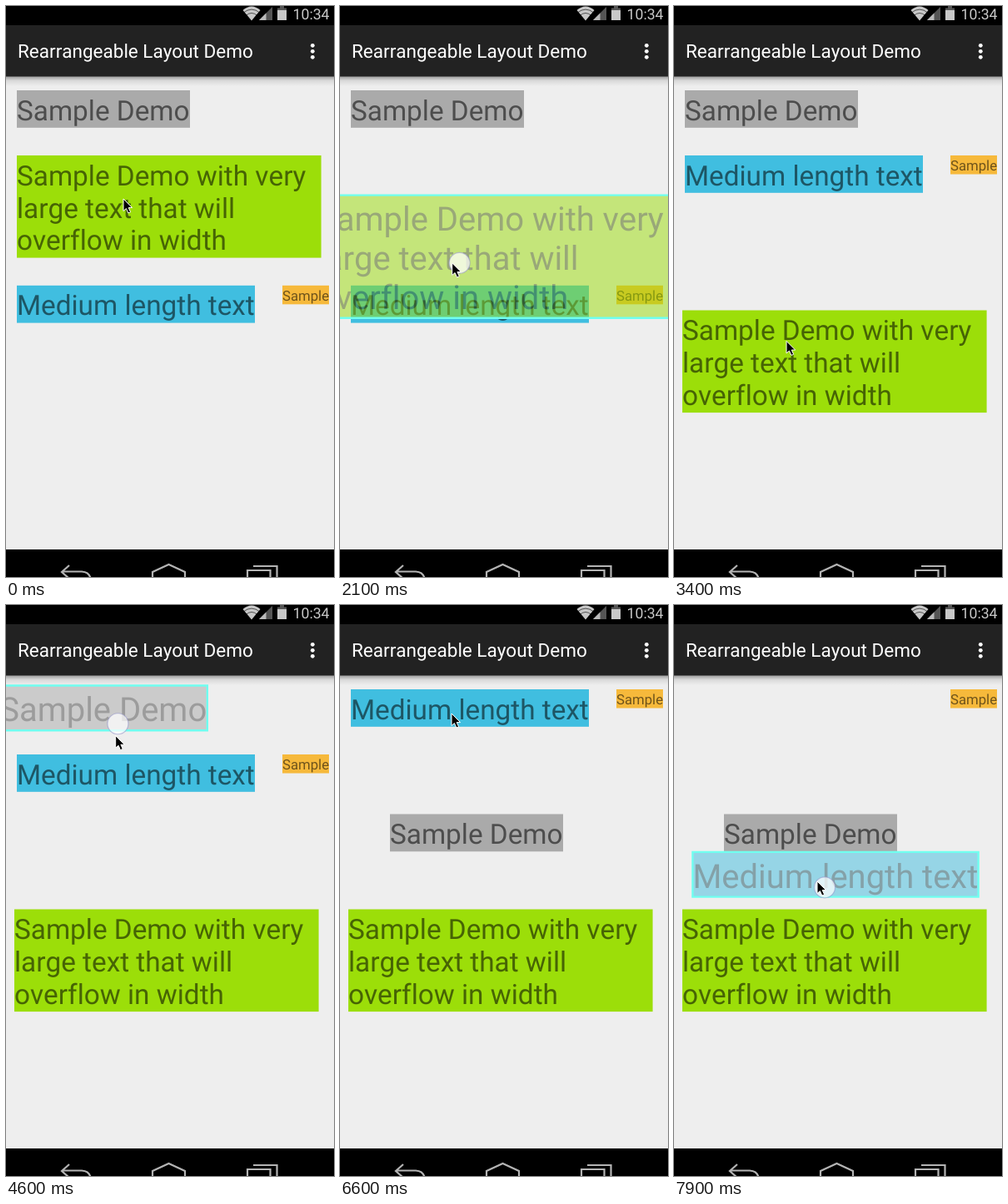
Write an HTML page that moves like this. It is 394 px wide and 684 px high and loops after 8 s.

```html
<!DOCTYPE html>
<html lang="en">
<head>
<meta charset="utf-8">
<title>Rearrangeable Layout Demo</title>
<style>
  html, body { margin: 0; width: 100%; height: 100%; overflow: hidden; background: #eee; }
  svg { display: block; width: 394px; height: 684px; font-family: Roboto, "Open Sans", sans-serif; }
  text { font-kerning: none; font-variant-ligatures: none; text-rendering: geometricPrecision; }
  .label { fill: #000; fill-opacity: .55; }
  .edge { fill: none; stroke: #70fff0; stroke-width: 2.4; vector-effect: non-scaling-stroke; }
</style>
</head>
<body>
<svg viewBox="0 0 394 684">
  <defs>
    <linearGradient id="shade" x2="0" y2="1">
      <stop offset="0" stop-color="#000" stop-opacity=".36"/>
      <stop offset=".45" stop-color="#000" stop-opacity=".09"/>
      <stop offset="1" stop-color="#000" stop-opacity="0"/>
    </linearGradient>
  </defs>
  <rect width="394" height="684" fill="#eee"/>
  <rect y="84" width="394" height="12" fill="url(#shade)"/>

  <g id="items"></g>

  <rect width="394" height="23" fill="#000"/>
  <rect y="23" width="394" height="61.5" fill="#222"/>
  <text x="14" y="62" font-size="22.5" fill="#fff">Rearrangeable Layout Demo</text>
  <g fill="#fff">
    <circle cx="368.3" cy="47.3" r="2.4"/>
    <circle cx="368.3" cy="54.3" r="2.4"/>
    <circle cx="368.3" cy="61.3" r="2.4"/>
  </g>

  <path d="M284.5 5Q295 -4 305.5 5L295 17.5z" fill="#c8c8c8"/>
  <path d="M285 8.2Q295 0 305 8.2M288 11.5Q295 5.5 302 11.5" fill="none" stroke="#000" stroke-opacity=".6"/>
  <path d="M320 1V17H304z" fill="#555"/>
  <path d="M312.5 8.5V17H304z" fill="#bbb"/>
  <path d="M326 2.5h3V0h5v2.5h3V17h-11z" fill="#555"/>
  <path d="M326 5h11v12h-11z" fill="#c8c8c8"/>
  <text x="344.5" y="16" font-size="17.7" fill="#c8c8c8">10:34</text>

  <rect y="651" width="394" height="33" fill="#000"/>
  <g fill="none" stroke="#b4b4b4" stroke-width="2.2">
    <path d="M76 670L67 678L76 686M67 677.5H91Q102 678 102 690"/>
    <path d="M176 690V678L195.5 669L215 678V690"/>
    <path d="M297 671H325.5V690M290 690V676H317.5V690"/>
  </g>

  <circle id="dot" r="12.5" fill="#fff" fill-opacity=".72" stroke="#8f90c8" stroke-opacity=".55" stroke-width="1.2"/>
  <path id="cursor" d="M0 0V14.5L3.4 11.6L5.8 17L8.6 15.8L6.2 10.6H10.6z" fill="#000" stroke="#fff"/>
</svg>
<script>
const LOOP = 8000, STEP = 100;
const DOT_LAG = 40, ITEM_LAG = 60;
const LEFT = 13, TOP = 101, GAP = 33.2, LINE = 38.9, PAD = 5.9;
const NS = "http://www.w3.org/2000/svg";
const byId = id => document.getElementById(id);

function add(parent, tag, attrs, text) {
  const el = document.createElementNS(NS, tag);
  for (const k in attrs) el.setAttribute(k, attrs[k]);
  if (text) el.textContent = text;
  return parent.appendChild(el);
}

function makeItem(w, fill, lines, scale = 1) {
  const h = (LINE * lines.length + PAD) * scale;
  const root = add(byId("items"), "g", {});
  const face = add(root, "g", {});
  add(face, "rect", { width: w, height: h, fill });
  lines.forEach((line, i) => add(face, "text", {
    class: "label", "font-size": 33.3 * scale, y: (35.6 + LINE * i) * scale
  }, line));
  const edge = add(root, "rect", { class: "edge", width: w, height: h });
  return { root, face, edge, w, h };
}

const yellow = makeItem(56, "#f6b93b", ["Sample"], .503);
const green = makeItem(365.6, "#9cde09",
  ["Sample Demo with very", "large text that will", "overflow in width"]);
const gray = makeItem(208, "#aaa", ["Sample Demo"]);
const blue = makeItem(286, "#40bee0", ["Medium length text"]);

// Lifted items grow around their centre and turn translucent.
function place(item, x, y, lifted = false) {
  const s = lifted ? 1.2 : 1;
  const left = x - item.w * (s - 1) / 2, top = y - item.h * (s - 1) / 2;
  item.root.setAttribute("transform", `translate(${left} ${top}) scale(${s})`);
  item.face.setAttribute("opacity", lifted ? .5 : 1);
  item.edge.setAttribute("visibility", lifted ? "visible" : "hidden");
  if (lifted) byId("items").appendChild(item.root);
}

const sine = u => (1 - Math.cos(Math.PI * u)) / 2;
const easeOut = u => 1 - (1 - u) ** 3;

// Pointer glides: start, end, destination, easing.
const home = [141, 231];
const glides = [
  [500, 600, 139, 236, sine],
  [1300, 1600, 134, 248, sine],
  [1600, 2850, 136, 421.5, sine],
  [3300, 3900, 122, 122, sine],
  [4540, 5240, 163, 269, easeOut],
  [5550, 5700, 169, 271.5, sine],
  [5900, 6500, 134, 130, sine],
  [7050, 7300, 172, 265, sine],
  [7300, 7900, 172, 331, sine]
];

function pointer(t) {
  let [x, y] = home;
  for (const [from, to, nx, ny, ease] of glides) {
    if (t <= from) break;
    const u = ease(Math.min(1, (t - from) / (to - from)));
    x += (nx - x) * u;
    y += (ny - y) * u;
  }
  return [x, y];
}

// Each drag frees one slot, and the items below move up.
const rows = [TOP, TOP + gray.h + GAP, TOP + gray.h + green.h + 2 * GAP];
const drags = [
  { item: green, row: 1, press: 600, lift: 1300, drop: 3100 },
  { item: gray, row: 0, press: 4000, lift: 4500, drop: 5800 },
  { item: blue, row: 0, press: 6700, lift: 7100, drop: LOOP }
];

function draw(t) {
  const row = rows[2 - drags.filter(d => t >= d.drop).length];
  place(yellow, 332, row);
  place(blue, LEFT, row);
  byId("dot").setAttribute("visibility", "hidden");

  for (const { item, row, press, lift, drop } of drags) {
    if (t >= lift) {
      const [x0, y0] = pointer(press);
      const [x, y] = pointer(Math.min(t, drop) - ITEM_LAG);
      place(item, LEFT + x - x0, rows[row] + y - y0, t < drop);
    } else if (item !== blue) {
      place(item, LEFT, rows[row]);
    }
    if (t >= press && t < drop) {
      const [x, y] = pointer(t - DOT_LAG);
      byId("dot").setAttribute("transform", `translate(${x + 9} ${y + 8})`);
      byId("dot").setAttribute("visibility", "visible");
    }
  }
  byId("cursor").setAttribute("transform", `translate(${pointer(t)})`);
}

let start = null, shown = -1;
function tick(now) {
  start ??= now;
  const t = Math.floor((now - start) % LOOP / STEP) * STEP;
  if (t !== shown) draw(shown = t);
  requestAnimationFrame(tick);
}
draw(0);
requestAnimationFrame(tick);
</script>
</body>
</html>
```
